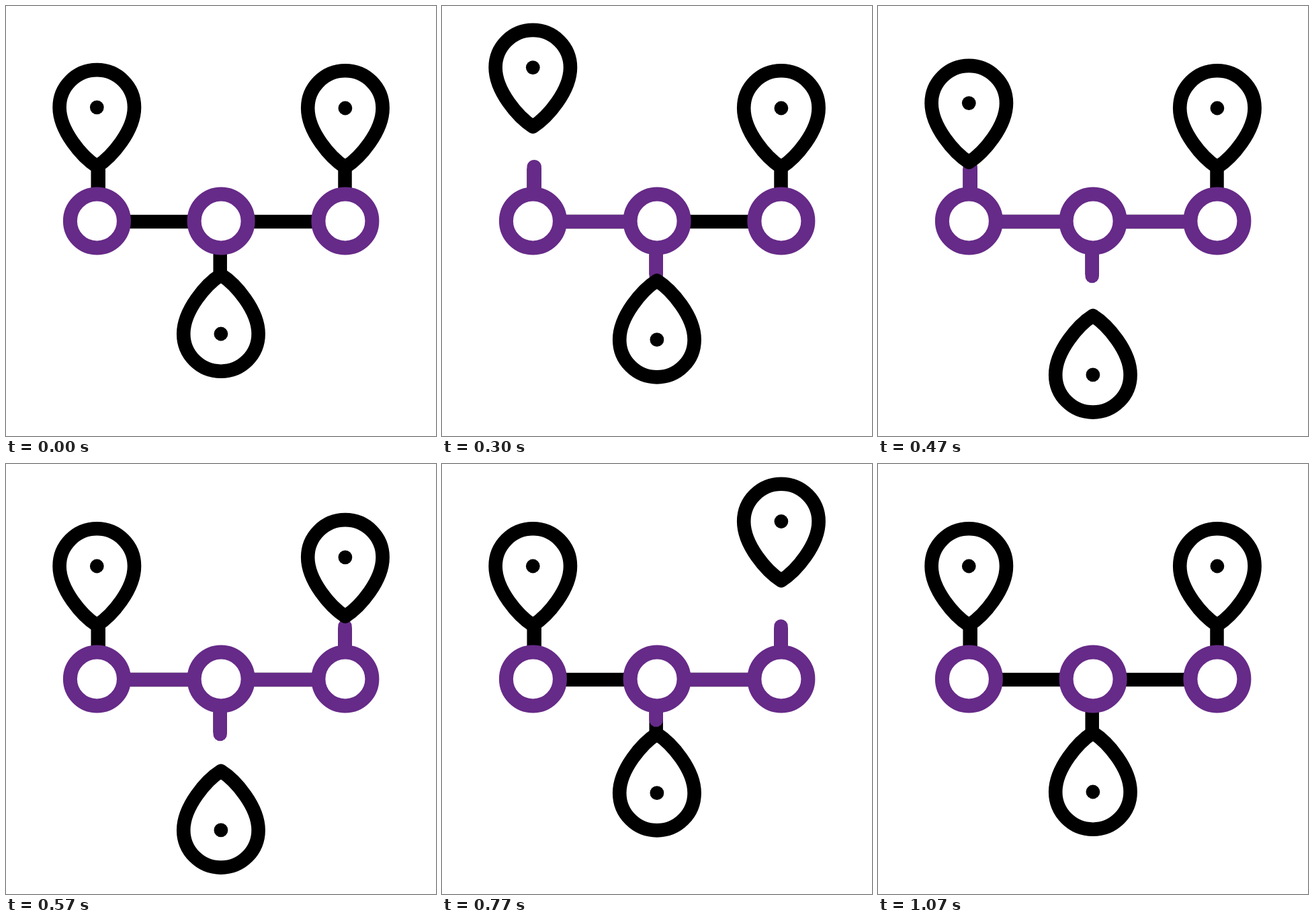
An HTML page with a canvas that plays this animation: 640x640 px, repeating every 1670 ms.

```html
<!DOCTYPE html>
<html>
<head>
<meta charset="utf-8">
<style>
  html, body { margin: 0; width: 100%; height: 100%; overflow: hidden; background: #fff; }
  canvas { display: block; }
</style>
</head>
<body>
<canvas id="stage" width="640" height="640"></canvas>
<script>
const ctx = document.getElementById('stage').getContext('2d');
const BLACK = '#000', PURPLE = '#662a88';
const LOOP = 1670, LAST_STEP = 32;
const teardrop = new Path2D('M-55.7 0A55.7 55.7 0 0 1 55.7 0C55.7 35 22 74 0 88C-22 74 -55.7 35 -55.7 0Z');

// Times are in steps of 1/30 s: [start, end] of going out and coming back.
const pins = [
  { x: 135.3, y: 152, dir: 1, lift: -66.5, out: [-0.7, 6.6], back: [7.1, 16.1] },
  { x: 319.9, y: 488, dir: -1, lift: 63, out: [6.9, 15.05], back: [15.05, 24.05] },
  { x: 504.9, y: 152, dir: 1, lift: -66.5, out: [14.5, 22.6], back: [23, 32] }
];
const links = [
  { from: [137.2, 280], to: [137.2, 239.7], width: 21.5, out: [0, 2], back: [14, 16] },
  { from: [175.5, 321], to: [280, 321], width: 20.5, out: [3.9, 6.9], back: [19, 22] },
  { from: [318.7, 360], to: [318.7, 402], width: 20.5, out: [6.9, 8.9], back: [22, 24] },
  { from: [360, 321], to: [465, 321], width: 20.5, out: [10.9, 13.9], back: [27, 30] },
  { from: [504.5, 280], to: [504.5, 241.5], width: 20.5, out: [14.9, 16.9], back: [30, 32] }
];

// Cubic ease-in-out with handles at .42 and .58, solved by bisection.
function ease(x) {
  if (x <= 0) return 0;
  if (x >= 1) return 1;
  let lo = 0, hi = 1, s;
  for (let i = 0; i < 20; i++) {
    s = (lo + hi) / 2;
    const bx = 3 * (1 - s) * s * (0.42 * (1 - s) + 0.58 * s) + s ** 3;
    if (bx < x) lo = s; else hi = s;
  }
  return s * s * (3 - 2 * s);
}

const ramp = (step, [a, b]) => ease((step - a) / (b - a));
const outAndBack = (step, part) => ramp(step, part.out) - ramp(step, part.back);

function line(link, amount, color, cap) {
  const [x, y] = link.from, [tx, ty] = link.to;
  ctx.strokeStyle = color;
  ctx.lineWidth = link.width;
  ctx.lineCap = cap;
  ctx.beginPath();
  ctx.moveTo(x, y);
  ctx.lineTo(x + (tx - x) * amount, y + (ty - y) * amount);
  ctx.stroke();
}

function ring(x) {
  ctx.strokeStyle = PURPLE;
  ctx.lineWidth = 21;
  ctx.beginPath();
  ctx.arc(x, 320, 40, 0, 2 * Math.PI);
  ctx.fillStyle = '#fff';
  ctx.fill();
  ctx.stroke();
}

function drawPin(pin, step) {
  ctx.save();
  ctx.translate(pin.x, pin.y + pin.lift * outAndBack(step, pin));
  ctx.scale(1, pin.dir);
  ctx.strokeStyle = BLACK;
  ctx.lineWidth = 20.6;
  ctx.lineJoin = 'round';
  ctx.fillStyle = '#fff';
  ctx.fill(teardrop);
  ctx.stroke(teardrop);
  ctx.fillStyle = BLACK;
  ctx.beginPath();
  ctx.arc(0, 0, 10.4, 0, 2 * Math.PI);
  ctx.fill();
  ctx.restore();
}

function draw(step) {
  ctx.fillStyle = '#fff';
  ctx.fillRect(0, 0, 640, 640);
  for (const link of links) {
    line(link, 0.95, BLACK, 'butt');
    const amount = outAndBack(step, link);
    if (amount > 0.001) line(link, amount, PURPLE, 'round');
  }
  [135.4, 320.1, 504.9].forEach(ring);
  for (const pin of pins) drawPin(pin, step);
}

const start = performance.now();
function tick() {
  const t = (performance.now() - start) % LOOP;
  // Steps begin at multiples of 1/30 s rounded to 10 ms.
  draw(Math.min(LAST_STEP, Math.floor((Math.floor(t / 10) + 0.34) * 0.3)));
  requestAnimationFrame(tick);
}
tick();
</script>
</body>
</html>
```
